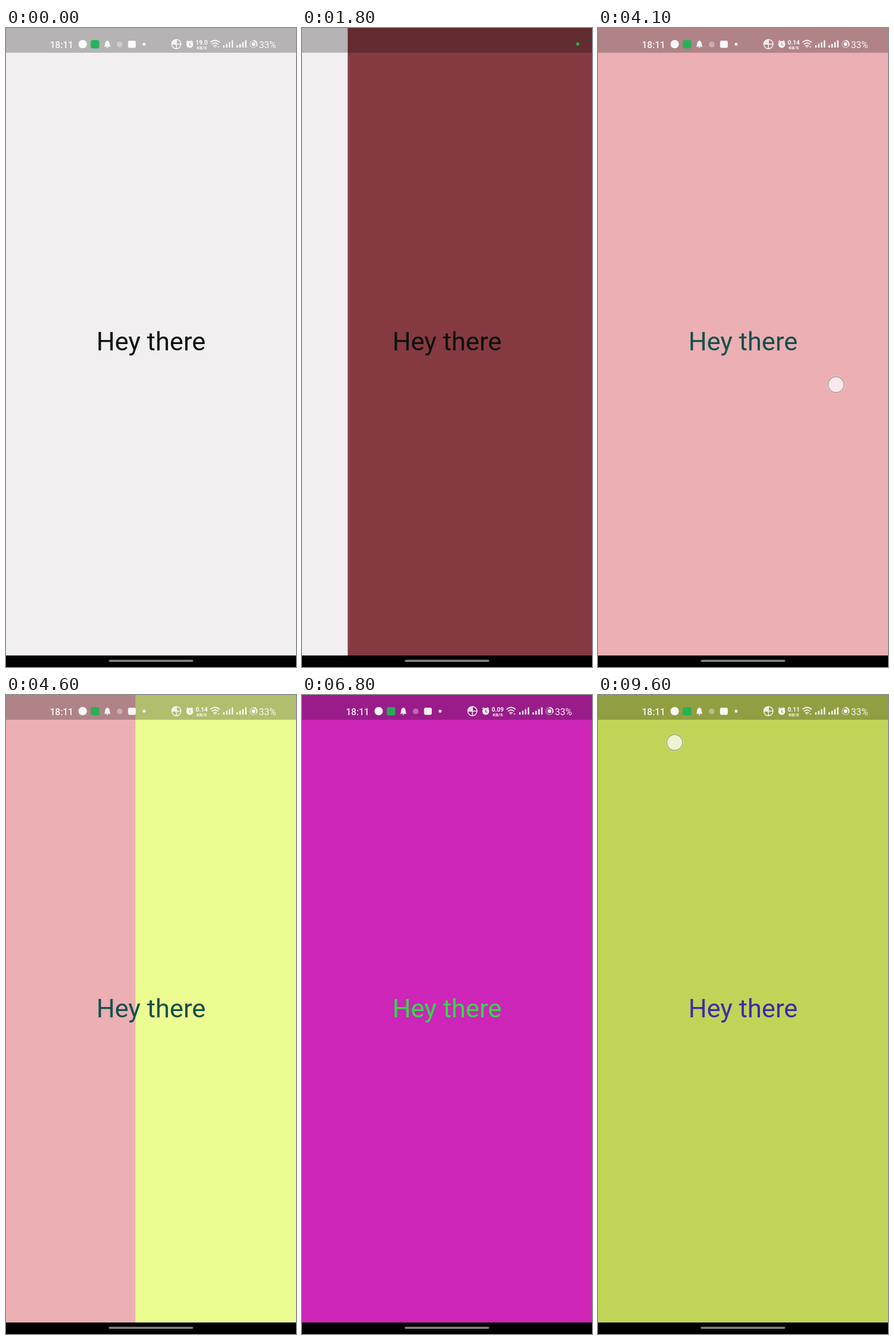
Recreate the animation shown at these times as an HTML page. Size 505x1110 px, loop 9700 ms.

```html
<!DOCTYPE html>
<html lang="en">
<head>
<meta charset="utf-8">
<title>Colour wipe</title>
<style>
  html, body { margin: 0; height: 100%; overflow: hidden; }
  svg { display: block; width: 100%; height: 100%; font-family: Roboto, "Open Sans", sans-serif; }
</style>
</head>
<body>
<svg viewBox="0 0 505 1110">
  <rect id="old" width="505" height="1110"/>
  <rect id="fresh" width="505" height="1110"/>
  <text id="hello" x="252.5" y="560" font-size="45" text-anchor="middle">Hey there</text>
  <rect width="505" height="43" fill-opacity=".25"/>

  <g id="icons" fill="#fff" fill-opacity=".94" stroke-opacity=".94">
    <text x="76.5" y="34.5" font-size="16" font-weight="500">18:11</text>
    <circle cx="133.5" cy="28" r="7.3"/>
    <rect x="147.5" y="21" width="15" height="14.5" rx="3.5" fill="#20b254"/>
    <path d="M170.5 32.5q2-1.500 2-4.500 0-4.500 3-5.200 0-1.200 1-1.200t1 1.200q3 .7 3 5.200 0 3 2 4.500zM175 33.300h3q0 1.500-1.500 1.500t-1.500-1.500"/>
    <circle cx="198" cy="28.500" r="5" fill-opacity=".35"/>
    <rect x="212.500" y="22" width="13.500" height="12.500" rx="3"/>
    <circle cx="240.500" cy="28" r="2.600"/>

    <g fill="none" stroke="#fff" stroke-width="1.500">
      <circle cx="296.700" cy="28" r="8"/>
      <path d="M296.700 20v16M289 28h15.500"/>
      <path d="M314 24.300l3-2.600M325.500 24.300l-3-2.600"/>
      <path d="M356 25q8-7 16 0M358.500 28.300q5.500-4.600 11 0M361 31.400q3-2.300 6 0" stroke-width="1.700"/>
      <path id="bars" d="M379.300 34v-4M384.300 34v-6.500M389.300 34v-9.500M394.300 34v-12.500" stroke-width="2.600"/>
      <use href="#bars" x="23.300"/>
      <circle cx="431" cy="28" r="6" stroke-width="1.800" stroke-opacity=".4"/>
      <path d="M431 22a6 6 0 0 1 5.200 9" stroke-width="1.800"/>
    </g>
    <path d="M296.700 28v-8a8 8 0 0 0-8 8z" fill-opacity=".8"/>
    <path d="M320 22.500a6 6 0 1 0 .01 0zM319.300 25.500v4l3 1.500.6-1.100-2.300-1.200v-3.200z" fill-rule="evenodd"/>
    <path d="M362 32l1.800 2.200 1.800-2.200zM368 32.300h4l-2 2z"/>
    <g font-weight="700" text-anchor="middle">
      <text id="speed" x="340.700" y="29" font-size="10.500"></text>
      <text x="340.900" y="36.500" font-size="7.800">KB/S</text>
    </g>
    <circle cx="431" cy="28" r="3.200"/>
    <text x="440.500" y="34.500" font-size="16">33%</text>
  </g>
  <circle id="dot" cx="480.200" cy="27.700" r="2.700" fill="#2fb84c"/>

  <rect y="1090" width="505" height="20"/>
  <rect x="179" y="1097.500" width="147" height="3.600" rx="1.800" fill="#8b8487"/>

  <g id="touch">
    <circle r="16" fill="#fff" fill-opacity=".15"/>
    <circle r="13.600" fill="#fff" fill-opacity=".68" stroke="#777" stroke-opacity=".5" stroke-width="1.600"/>
  </g>
</svg>
<script>
const LOOP = 9700, WIPE = 755, PRESS = 90, WIDTH = 505;
const first = [241, 239, 240];
const wipes = [
  { at: 1165, color: [132, 58, 64] },
  { at: 2732, color: [235, 175, 180] },
  { at: 4183, color: [236, 253, 146] },
  { at: 5880, color: [204, 37, 184] },
  { at: 7350, color: [193, 212, 88] }
];
const speeds = [[0, "19.0"], [2200, "0.14"], [5400, "0.09"], [8700, "0.11"]];

const $ = id => document.getElementById(id);
const rgb = c => `rgb(${c})`;
const invert = c => c.map(v => 255 - v);
const clamp = v => Math.max(0, Math.min(1, v));

function draw(t) {
  let back = first, front = first, edge = 0;
  for (const w of wipes) {
    if (t < w.at) break;
    back = front;
    front = w.color;
    edge = WIDTH * (1 - clamp((t - w.at) / WIPE));
  }
  $("old").setAttribute("fill", rgb(back));
  $("fresh").setAttribute("fill", rgb(front));
  $("fresh").setAttribute("x", edge);
  // The label keeps its old colour until the wipe is complete.
  $("hello").setAttribute("fill", rgb(invert(edge > 0 ? back : front)));

  const hidden = clamp((t - 50) / 250) * (1 - clamp((t - 2100) / 250));
  $("icons").setAttribute("opacity", 1 - hidden);
  $("dot").setAttribute("opacity", hidden);
  $("speed").textContent = speeds.findLast(s => t >= s[0])[1];

  const pulling = t >= 9580;
  const pressed = pulling || wipes.some(w => t >= w.at - PRESS && t < w.at);
  $("touch").setAttribute("visibility", pressed ? "visible" : "hidden");
  $("touch").setAttribute("transform", pulling ? "translate(133.500 82.500)" : "translate(414.500 619.500)");
}

const start = performance.now();
function tick() {
  draw((performance.now() - start) % LOOP);
  requestAnimationFrame(tick);
}
tick();
</script>
</body>
</html>
```
